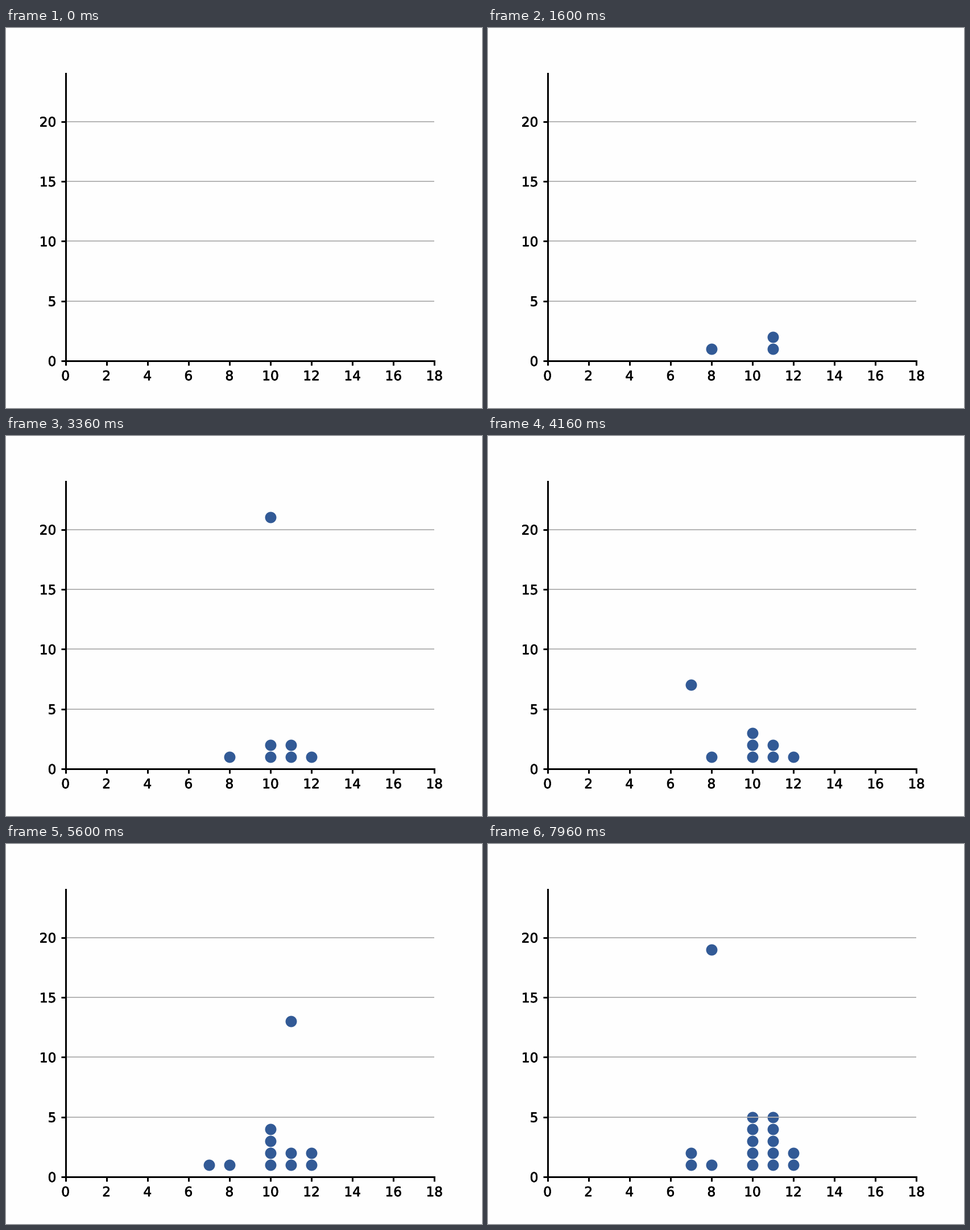
A matplotlib script for the animation above (8000 ms loop, 837x669 px).

```python
import matplotlib.pyplot as plt
from matplotlib import patheffects
from matplotlib.animation import FuncAnimation
from matplotlib.patches import Ellipse

W, H, DPI = 837, 669, 100
FRAMES, INTERVAL = 200, 40
PT = 1.673                      # scale for default point sizes
X_MAX, Y_MAX, Y_START = 18, 24, 23
LEFT, RIGHT, BOTTOM, TOP = 0.125, 0.9, 0.1242, 0.88
RADIUS = 9.96
COLOR = "#325a96"
COLUMNS = [11, 11, 8, 10, 10, 12, 10, 7, 12, 10, 11, 11, 7, 11, 10, 8]

plt.rcParams["font.family"] = "DejaVu Sans"

X0, Y0 = LEFT * W, BOTTOM * H
UX = (RIGHT - LEFT) * W / X_MAX
UY = (TOP - BOTTOM) * H / Y_MAX


def fall(rest):
    """Heights of one drop: steps of two, single steps near the stack."""
    y = Y_START
    while y > rest:
        yield y
        y -= 2 if y - 2 > rest else 1
    yield rest
    yield rest


def build_timeline():
    states, landed = [[]], []
    for col in COLUMNS:
        rest = 1 + sum(x == col for x, _ in landed)
        states += [landed + [(col, y)] for y in fall(rest)]
        landed = landed + [(col, rest)]
    return states[:FRAMES]


def pixel_center(x, y):
    """Data position moved to the middle of its pixel."""
    px = round(X0 + x * UX) + 0.5
    py = H - round(H - Y0 - y * UY) - 0.5
    return (px - X0) / UX, (py - Y0) / UY


# The small margin keeps the pixel size from being rounded down.
fig = plt.figure(figsize=((W + 0.01) / DPI, (H + 0.01) / DPI), dpi=DPI,
                 facecolor="#fefefe")
ax = fig.add_axes([LEFT, BOTTOM, RIGHT - LEFT, TOP - BOTTOM], facecolor="none")
ax.set_xlim(0, X_MAX)
ax.set_ylim(0, Y_MAX)
ax.set_xticks(range(0, X_MAX + 1, 2))
ax.set_yticks(range(0, 21, 5))
ax.grid(axis="y", color="#b0b0b0", linewidth=0.8 * PT)
ax.tick_params(length=3.5 * PT, pad=3.5 * PT, width=2.16, labelsize=10 * PT)
ax.spines[["top", "right"]].set_visible(False)
ax.spines[["left", "bottom"]].set_linewidth(2.16)
for label in ax.get_xticklabels() + ax.get_yticklabels():
    label.set_path_effects([patheffects.withStroke(linewidth=0.5, foreground="black")])

timeline = build_timeline()
dots = [
    ax.add_patch(Ellipse((0, 0), 2 * RADIUS / UX, 2 * RADIUS / UY,
                         facecolor=COLOR, linewidth=0, zorder=1, visible=False))
    for _ in COLUMNS
]


def update(frame):
    state = timeline[frame]
    for i, dot in enumerate(dots):
        dot.set_visible(i < len(state))
        if i < len(state):
            dot.set_center(pixel_center(*state[i]))
    return dots


anim = FuncAnimation(fig, update, frames=FRAMES, interval=INTERVAL,
                     init_func=lambda: update(0), repeat=True, repeat_delay=0)
plt.show()
```
